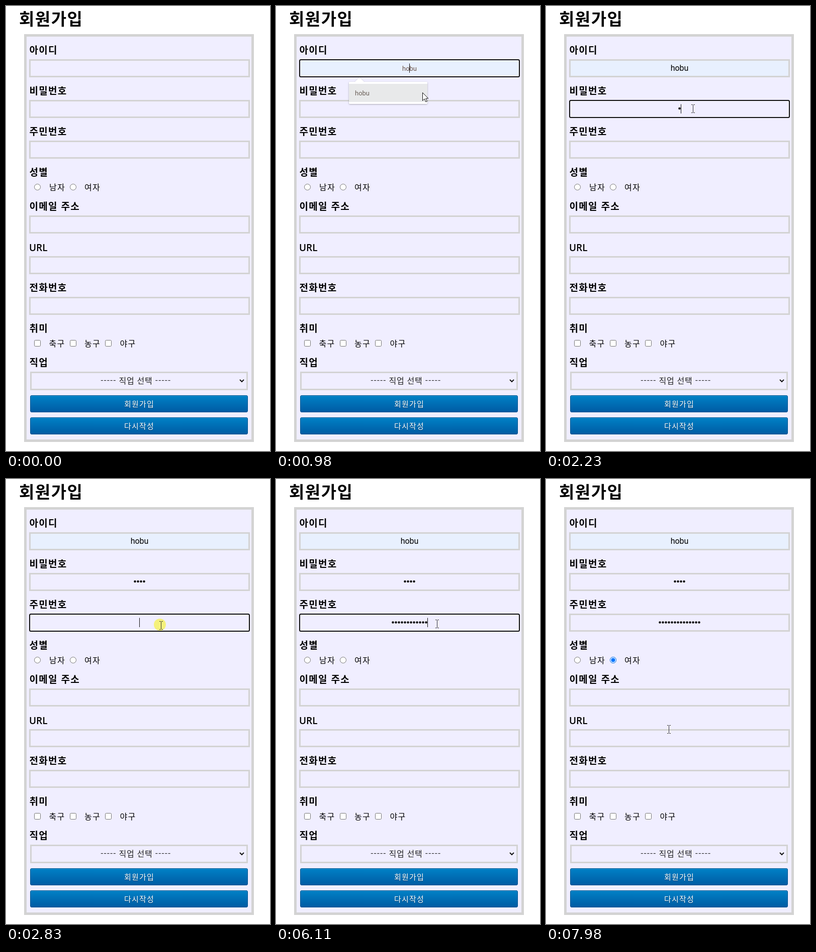
Recreate the animation shown at these times as an HTML page. Size 525 px wide and 886 px high, loop 8 s.

```html
<!DOCTYPE html>
<html lang="ko">
<head>
<meta charset="utf-8">
<title>회원가입</title>
<style>
  html, body { margin: 0; width: 100%; height: 100%; overflow: hidden; background: #fff; }
  svg { display: block; width: 525px; height: 886px; }
  text { font-family: "Noto Sans CJK KR", "Noto Sans CJK", sans-serif; font-size: 16px; letter-spacing: 1.2px; white-space: pre; }
  .title { font-size: 33px; font-weight: 700; letter-spacing: 1.5px; }
  .label { font-size: 19px; font-weight: 700; letter-spacing: 1.3px; }
  .latin { font-family: "Open Sans", sans-serif; font-weight: 600; letter-spacing: 0; }
  .choice { letter-spacing: .7px; }
  .button { font-size: 15px; fill: #fff; text-shadow: 0 1px 1px rgba(0,0,0,.35); }
  .typed { font-family: Roboto, sans-serif; letter-spacing: 0; }
  .mid { text-anchor: middle; }
</style>
</head>
<body>
<svg id="stage" viewBox="0 0 525 886">
  <defs>
    <linearGradient id="blue" x2="0" y2="1">
      <stop offset="0" stop-color="#0081c6"/>
      <stop offset="1" stop-color="#005ba3"/>
    </linearGradient>
    <filter id="shadow" x="-10%" y="-20%" width="120%" height="150%">
      <feDropShadow dx="0" dy="1" stdDeviation="1.5" flood-opacity=".3"/>
    </filter>
  </defs>
  <g id="form"></g>
  <g id="live"></g>
  <g id="popup">
    <g fill="#fff" filter="url(#shadow)">
      <path d="M145 153q0-2 2-2h10l9-9 9 9h124q2 0 2 2v40q0 2-2 2H147q-2 0-2-2z"/>
    </g>
    <rect id="option" x="145" y="155" width="156" height="36" fill="#e8e9ea"/>
    <text class="typed" x="157" y="178" style="font-size:13px" fill="#6a5f58">hobu</text>
  </g>
  <circle id="halo" r="12" fill="#f5f169" opacity=".88"/>
  <path id="arrow" d="M.5.5v16l3.7-3.6 2.7 6 2.5-1.1-2.6-5.8h5z" fill="#fff" stroke="#111"/>
  <path id="beam" d="M-3.5-8h2.5l1 1 1-1h2.500M0-7v14M-3.500 8h2.500l1-1 1 1h2.500" fill="none" stroke="#333"/>
</svg>
<script>
const LOOP = 8000, STEP = 66, MID = 265.5, NAME = 'hobu';
const $ = id => document.getElementById(id);
const FIELDS = [106, 187, 268, 417, 498, 579];

const rect = (x, y, w, h, rest) => `<rect x="${x}" y="${y}" width="${w}" height="${h}" ${rest}/>`;
const text = (x, y, s, cls = '', rest = '') => `<text x="${x}" y="${y}" class="${cls}" ${rest}>${s}</text>`;
const frame = (x, y, w, h, b) =>
  rect(x + b / 2, y + b / 2, w - b, h - b, `fill="#f0eeff" stroke="#d3d3d3" stroke-width="${b}"`);

function drawForm() {
  const labels = [['아이디', 95], ['비밀번호', 176], ['주민번호', 257], ['성별', 338],
    ['이메일 주소', 406], ['전화번호', 568], ['취미', 649], ['직업', 717]];
  const outline = 'fill="#fff" stroke="#767676"';
  const radio = x => `<circle cx="${x}" cy="360.5" r="6" ${outline}/>`;
  const check = x => rect(x + .5, 665.5, 12, 12, `rx="2" ${outline}`);
  const button = (y, s) =>
    rect(48.5, y + .5, 432, 33, 'rx="2.5" fill="url(#blue)" stroke="#00518c"') +
    rect(50, y + 1, 429, 1, 'fill="#3fa0d8" opacity=".6"') +
    text(265, y + 22.5, s, 'button mid');

  $('form').innerHTML =
    text(26, 37.5, '회원가입', 'title') +
    frame(36, 56, 457, 812, 5) +
    labels.map(([s, y]) => text(46.5, y, s, 'label')).join('') +
    text(46, 488, 'URL', 'label latin') +
    FIELDS.map(y => frame(46, y, 439, 36, 3)).join('') +
    radio(62.5) + radio(133.5) +
    text(86, 367, '남자') + text(156, 367, '여자') +
    [56, 127, 197].map(check).join('') +
    ['축구', '농구', '야구'].map((s, i) => text(85.5 + i * 70.5, 678, s)).join('') +
    frame(48, 728, 433, 37, 3) +
    text(258, 752, '----- 직업 선택 -----', 'choice mid', 'fill="#222"') +
    '<path d="M465 744l4 4 4-4" fill="none" stroke="#111" stroke-width="2"/>' +
    button(775, '회원가입') + button(819, '다시작성');
}

// Pointer moves: start time, number of steps, destination
const MOVES = [
  [130, 8, 300, 128], [730, 3, 291, 172], [1310, 5, 292, 204], [2500, 5, 308, 291],
  [4176, 3, 307, 312], [4374, 3, 320, 288], [6646, 9, 134, 364], [7244, 3, 134, 359],
  [7780, 3, 244, 520], [7978, 1, 244, 498]
];
const CLICKS = [[660, 730], [1180, 1250], [1700, 1840], [2830, 2960], [7510, 7640]];
const PASSWORD = [2170, 2240, 2370, 2440];
const NUMBER = [3090, 3230, 3310, 3520, 3790, 3980, 4840, 5440, 5580, 5710, 5910, 6110, 6310, 6510];

const within = (t, a, b) => t >= a && t < b;
const countAt = (times, t) => times.filter(k => k <= t).length;

function pointerAt(t) {
  let x = 507, y = 886;
  for (const [start, steps, tx, ty] of MOVES) {
    if (t < start) break;
    const p = Math.min(1, (Math.floor((t - start) / STEP) + 1) / steps);
    const e = p * p * (3 - 2 * p);
    x += (tx - x) * e;
    y += (ty - y) * e;
  }
  return [x, y];
}

function focusAt(t) {
  if (t < 660 || t >= 7510) return -1;
  return t < 1770 ? 0 : t < 2830 ? 1 : 2;
}

const dots = (n, y) => Array.from({ length: n }, (_, i) =>
  `<circle cx="${MID + 6 * i - 3 * (n - 1)}" cy="${y}" r="2.3" fill="#151515"/>`).join('');

function place(id, shown, x, y) {
  $(id).setAttribute('visibility', shown ? 'visible' : 'hidden');
  $(id).setAttribute('transform', `translate(${x} ${y})`);
}

function render(t) {
  const [x, y] = pointerAt(t);
  const focus = focusAt(t);
  const popup = within(t, 730, 1250);
  const hover = popup && y > 155;
  const filled = t >= 1250;
  const secret = countAt(PASSWORD, t), number = countAt(NUMBER, t);
  let out = '';

  if (hover || filled) out += rect(49, 109, 433, 30, 'fill="#e8f0fe"');
  if (focus >= 0) {
    const top = FIELDS[focus];
    out += rect(48.5, top + 2.5, 434, 31, 'fill="none" stroke="#f4f4fb"') +
      rect(46, top, 439, 36, 'fill="none" stroke="#f0eeff"') +
      rect(47, top + 1, 437, 34, 'rx="2.5" fill="none" stroke="#101010" stroke-width="2"');
  }
  if (filled) out += text(MID, 129, NAME, 'typed mid');
  else if (hover) out += text(MID, 129, NAME, 'typed mid', 'style="font-size:13px" fill="#6a5348"');
  out += dots(secret, 204) + dots(number, 285.5);

  if (focus >= 0 && !within(t, 4500, 4840)) {
    const end = [filled ? 18 : 0, 3 * secret, 3 * number][focus];
    out += rect(Math.floor(MID + end), FIELDS[focus] + 8.5, 1, 18.5, 'fill="#111"');
  }
  if (t >= 7640) {
    out += '<circle cx="133.5" cy="360.5" r="6" fill="#fff" stroke="#0075ff"/>' +
      '<circle cx="133.5" cy="360.5" r="4" fill="#0075ff"/>';
  }
  $('live').innerHTML = out;

  $('popup').setAttribute('visibility', popup ? 'visible' : 'hidden');
  $('option').setAttribute('fill', hover ? '#e8e9ea' : '#fff');
  const beam = !popup && x > 46 && x < 485 && FIELDS.some(top => y >= top && y <= top + 36);
  place('halo', CLICKS.some(([a, b]) => within(t, a, b)), x - 2, y - 1);
  place('arrow', t >= 130 && !beam, Math.round(x), Math.round(y));
  place('beam', t >= 130 && beam, Math.round(x) + .5, Math.round(y) + .5);
}

drawForm();
const begin = performance.now();
function tick() {
  render((performance.now() - begin) % LOOP);
  requestAnimationFrame(tick);
}
tick();
</script>
</body>
</html>
```
